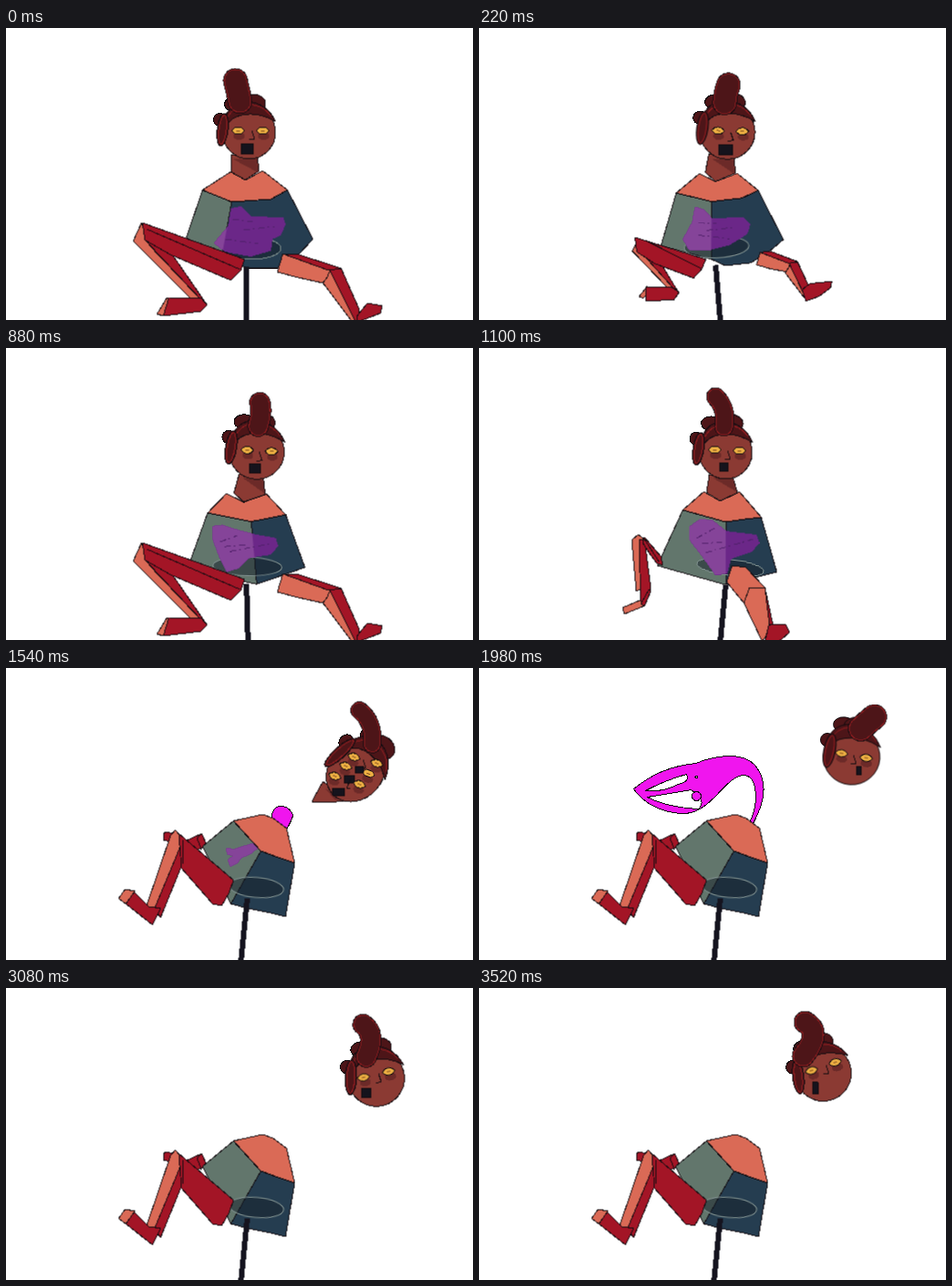
Animation, 512 px wide and 320 px high, one loop 3.63 s. Source, as an HTML page without scripts:

```html
<!DOCTYPE html>
<html lang="en">
<head>
<meta charset="utf-8">
<title>Puppet</title>
<style>
html, body { margin: 0; width: 100%; height: 100%; overflow: hidden; background: #fff }
svg { display: block; width: 100vw; height: 100vh; shape-rendering: crispEdges; stroke: #120c10; stroke-linejoin: round }
svg * { vector-effect: non-scaling-stroke; animation: 3.63s steps(5) infinite }
@property --w { syntax: '<length>'; inherits: true; initial-value: 24px }

.red { fill: #a31526 }
.salmon { fill: #da6a56 }
.skin { fill: #8b3a33 }
.shade { fill: #6c2a28; stroke: none }
.green { fill: #62766c }
.navy { fill: #253d50 }
.hair { fill: #4d1518 }
.dark { fill: #15131c }
.pink { fill: #f015ee }
.blob { stroke-width: 2; animation-name: blob }
.bun { fill: none; stroke-linecap: round; animation-name: bun }
.loose { animation-name: loose }
.cut { animation-timing-function: step-end }

/* torso */
@keyframes shoulders {
  0% { d: path("M215 177 247 190 290 187 308 177 281 156 262 166 246 157Z") }
  15.15% { d: path("M217 185 266 189 284 184 302 178 285 163 254 170 234 162Z") }
  30.3% { d: path("M223 177 270 190 291 187 309 185 285 157 264 167 246 157Z"); animation-timing-function: steps(4) }
  42.42%, 100% { d: path("M249 167 279 200 298 207 316 213 307 175 292 164 281 160Z") }
}
@keyframes left {
  0% { d: path("M215 177 247 190 236 250 197 230Z") }
  15.15% { d: path("M217 185 266 189 281 257 202 251Z") }
  30.3% { d: path("M223 177 270 190 270 259 195 238Z"); animation-timing-function: steps(4) }
  42.42%, 100% { d: path("M249 167 279 200 246 258 215 195Z") }
}
@keyframes right {
  0% { d: path("M247 190 290 187 308 177 336 231 320 248 298 262 262 262 236 250Z") }
  15.15% { d: path("M266 189 284 184 302 178 329 232 312 241 297 249 281 257 281 257Z") }
  30.3% { d: path("M270 190 291 187 309 185 326 245 310 249 290 254 270 259 270 259Z"); animation-timing-function: steps(4) }
  42.42%, 100% { d: path("M279 200 298 207 316 213 306 272 290 268 265 263 246 258 246 258Z") }
}
@keyframes blob {
  0% { d: path("M247 198 257 196 268 207 303 208 305 215 300 226 291 230 289 243 268 249 240 244 229 235 244 217Z") }
  15.15% { d: path("M222 195 228 204 233 211 270 209 282 214 283 222 275 230 250 227 229 231 216 239 217 225 220 205Z") }
  30.3% { d: path("M231 196 242 188 255 189 270 201 303 205 306 213 298 222 275 230 271 246 259 247 244 226 231 209Z"); animation-timing-function: steps(4) }
  42.42% { d: path("M242 198 250 199 262 195 273 192 275 196 268 202 257 207 252 213 246 216 244 210 250 205 243 203Z"); opacity: 1; animation-timing-function: step-end }
  45.45%, 100% { d: path("M242 198 250 199 262 195 273 192 275 196 268 202 257 207 252 213 246 216 244 210 250 205 243 203Z"); opacity: 0 }
}
@keyframes marks {
  0% { d: path("M248 209 270 212M260 221 294 217M240 231 276 236") }
  15.15% { d: path("M228 218 246 217M232 222 262 219M240 220 272 222") }
  30.3% { d: path("M238 208 258 197M244 214 266 212M248 224 300 209"); opacity: 1; animation-timing-function: step-end }
  33.33%, 100% { d: path("M238 208 258 197M244 214 266 212M248 224 300 209"); opacity: 0 }
}
@keyframes ring {
  0% { translate: 268px 241px; rotate: 0deg; scale: 33 12 }
  15.15% { translate: 248px 237px; rotate: -6deg; scale: 39 12 }
  30.3% { translate: 275px 240px; rotate: 7deg; scale: 37 9; animation-timing-function: steps(4) }
  42.42%, 100% { translate: 274px 240px; rotate: 5deg; scale: 30 11 }
}
@keyframes pole {
  0% { d: path("M263 261 263 322") }
  15.15% { d: path("M253 257 266 322") }
  30.3% { d: path("M270 259 264 322"); animation-timing-function: steps(4) }
  42.42%, 100% { d: path("M264 252 257 322") }
}
@keyframes under { 0%, 18.18%, 100% { opacity: 0 } 9.09% { opacity: 1 } }

/* near leg */
@keyframes thigh {
  0%, 24.24% { d: path("M149 213 261 253 257 265 246 276 180 248 152 232Z") }
  15.15% { d: path("M203 253 229 253 224 262 218 270 210 272 203 264Z"); animation-timing-function: steps(3) }
  24.24% { animation-timing-function: steps(2) }
  30.3% { d: path("M181 207 199 228 201 238 194 235 186 224 179 213Z"); animation-timing-function: steps(4) }
  42.42%, 100% { d: path("M189 181 249 232 244 246 236 260 226 258 192 219Z") }
}
@keyframes crease {
  0%, 24.24% { d: path("M154 220 256 264") }
  15.15% { d: path("M229 253 224 262"); animation-timing-function: steps(3) }
  24.24% { animation-timing-function: steps(2) }
  30.3% { d: path("M181 209 197 234"); animation-timing-function: steps(4) }
  42.42%, 100% { d: path("M193 188 193 214") }
}
@keyframes shin {
  0%, 24.24% { d: path("M139 233 148 213 157 238 212 296 203 297Z") }
  15.15% { d: path("M210 260 214 258 216 262 214 266 210 264Z"); animation-timing-function: steps(3) }
  24.24% { animation-timing-function: steps(2) }
  30.3% { d: path("M167 210 174 204 181 209 181 262 172 266Z"); animation-timing-function: steps(4) }
  42.42%, 100% { d: path("M180 183 185 177 194 187 163 264 153 262Z") }
}
@keyframes calf {
  0%, 24.24% { d: path("M152 232 182 248 220 303 213 297Z") }
  15.15% { d: path("M210 260 216 258 214 266 210 264Z"); animation-timing-function: steps(3) }
  24.24% { animation-timing-function: steps(2) }
  30.3% { d: path("M175 209 181 209 188 264 177 282Z"); animation-timing-function: steps(4) }
  42.42%, 100% { d: path("M194 187 193 214 169 273 162 264Z") }
}
@keyframes sole {
  0%, 24.24% { d: path("M165 313 176 295 182 297 172 315Z") }
  15.15% { d: path("M190 265 195 265 197 268 191 267Z"); animation-timing-function: steps(3) }
  24.24% { animation-timing-function: steps(2) }
  30.3% { d: path("M157 284 176 276 181 282 159 291Z"); animation-timing-function: steps(4) }
  42.42%, 100% { d: path("M123 252 130 242 141 244 132 259Z") }
}
@keyframes foot {
  0%, 24.24% { d: path("M178 295 214 296 220 303 213 310 172 315Z") }
  15.15% { d: path("M188 265 204 264 218 268 214 278 198 275Z"); animation-timing-function: steps(3) }
  24.24% { animation-timing-function: steps(2) }
  30.3% { d: path("M178 278 186 264 188 266 181 282 177 280Z"); animation-timing-function: steps(4) }
  42.42%, 100% { d: path("M140 245 156 261 169 263 160 281 131 258Z") }
}

/* other leg: swings in front, then folds away behind */
@keyframes thigh2 {
  0%, 24.24% { d: path("M303 247 355 264 352 272 347 279 320 273 297 267Z") }
  15.15% { d: path("M315 243 320 240 321 244 320 248 317 249 314 247Z"); animation-timing-function: steps(3) }
  24.24% { animation-timing-function: steps(2) }
  30.3%, 100% { d: path("M277 238 292 240 313 262 296 262 290 279 271 256Z") }
}
@keyframes strip2 {
  0%, 24.24% { d: path("M303 247 318 247 367 263 353 265Z") }
  15.15% { d: path("M315 243 320 240 321 244 318 246Z"); animation-timing-function: steps(3) }
  24.24% { animation-timing-function: steps(2) }
  30.3%, 100% { d: path("M292 240 292 240 313 262 313 262Z") }
}
@keyframes shin2 {
  0%, 24.24% { d: path("M352 265 356 264 385 321 378 320 347 279Z") }
  15.15% { d: path("M317 246 322 246 326 252 322 256 318 252Z"); animation-timing-function: steps(3) }
  24.24% { animation-timing-function: steps(2) }
  30.3%, 100% { d: path("M296 261 313 262 322 304 310 321 290 279Z") }
}
@keyframes calf2 {
  0%, 24.24% { d: path("M354 264 367 263 386 306 387 321 382 320Z") }
  15.15% { d: path("M317 246 322 246 326 252 322 256 318 252Z"); animation-timing-function: steps(3) }
  24.24% { animation-timing-function: steps(2) }
  30.3%, 100% { d: path("M313 262 313 262 322 304 314 316 318 303Z") }
}
@keyframes foot2 {
  0%, 24.24% { d: path("M384 316 390 308 396 301 412 304 410 312 400 316 384 322Z") }
  15.15% { d: path("M308 242 322 236 326 246 348 237 347 243 331 260 319 264Z"); animation-timing-function: steps(3) }
  24.24% { animation-timing-function: steps(2) }
  30.3%, 100% { d: path("M313 321 317 304 320 302 336 303 340 311 331 319 325 322Z") }
}
@keyframes early { 0% { opacity: 1 } 36.36%, 100% { opacity: 0 } }
@keyframes late { 0% { opacity: 0 } 36.36%, 100% { opacity: 1 } }

/* head */
@keyframes neck {
  0% { d: path("M246 138 275 140 277 156 262 166 246 157Z") }
  15.15% { d: path("M260 136 287 142 285 163 254 170 250 159Z") }
  30.3% { d: path("M252 138 278 142 283 158 264 167 249 158Z"); animation-timing-function: steps(4) }
  42.42% { d: path("M347 124 378 144 362 146 335 146 338 140Z"); animation-timing-function: steps(4) }
  54.54%, 100% { d: path("M400 104 412 108 410 112 402 114 398 110Z") }
}
@keyframes throat {
  0% { d: path("M248 143 275 142 276 158Z") }
  15.15% { d: path("M264 142 286 146 285 162Z") }
  30.3% { d: path("M256 142 278 142 282 157Z"); animation-timing-function: steps(4) }
  42.42% { d: path("M350 132 372 144 360 144Z"); animation-timing-function: steps(4) }
  54.54%, 100% { d: path("M402 106 408 108 404 110Z") }
}
@keyframes attached { 0% { opacity: 1 } 54.54%, 100% { opacity: 0 } }
@keyframes head {
  0% { translate: 266px 114px; rotate: 0deg; scale: 1 1 }
  15.15% { translate: 281px 113px; rotate: 3deg; scale: 1.1 1.06 }
  30.3% { translate: 270px 114px; rotate: 2deg; scale: 1 1; animation-timing-function: steps(4) }
  42.42% { translate: 383px 113px; rotate: 42deg; scale: 1.03 1.22; animation-timing-function: steps(4) }
  54.54% { translate: 408px 97px; rotate: 4deg; scale: 1.07 1.05; animation-timing-function: steps(6) }
  72.72% { translate: 394px 104px; rotate: 5deg; scale: 1.07 1.07; animation-timing-function: steps(8) }
  96.96%, 100% { translate: 377px 93px; rotate: -14deg; scale: 1.06 1.05 }
}
@keyframes loose {
  0% { translate: -3px 0 }
  15.15% { translate: 3px -2px }
  30.3% { translate: -4px 0; animation-timing-function: steps(4) }
  42.42% { translate: 0 0; animation-timing-function: steps(4) }
  54.54% { translate: 3px -2px; animation-timing-function: steps(6) }
  72.72%, 100% { translate: 0 0 }
}
@keyframes bun {
  0% { d: path("M256 80Q254 68 251 57") }
  15.15% { d: path("M288 84Q294 73 306 69") }
  30.3% { d: path("M268 86Q272 66 259 53"); animation-timing-function: steps(4) }
  42.42% { d: path("M401 83Q403 58 387 46"); animation-timing-function: steps(4) }
  54.54% { d: path("M418 66Q424 60 433 53"); animation-timing-function: steps(6) }
  72.72% { d: path("M394 76Q396 52 385 42"); animation-timing-function: steps(8) }
  96.96%, 100% { d: path("M355 74Q376 48 357 37") }
}
@keyframes bunsize {
  0%, 15.15% { --w: 24px }
  30.3% { --w: 18px; animation-timing-function: steps(4) }
  42.42% { --w: 17px; animation-timing-function: steps(4) }
  54.54% { --w: 25px; animation-timing-function: steps(6) }
  72.72% { --w: 19px; animation-timing-function: steps(8) }
  96.96%, 100% { --w: 22px }
}
@keyframes eye {
  0% { translate: 254px 112px; rotate: 0deg }
  15.15% { translate: 273px 112px; rotate: 10deg }
  30.3% { translate: 258px 111px; rotate: 0deg; animation-timing-function: steps(4) }
  42.42% { translate: 372px 107px; rotate: 20deg; animation-timing-function: steps(4) }
  54.54% { translate: 397px 93px; rotate: 8deg; animation-timing-function: steps(6) }
  72.72% { translate: 379px 105px; rotate: -6deg; animation-timing-function: steps(8) }
  96.96%, 100% { translate: 364px 90px; rotate: -16deg }
}
@keyframes eye2 {
  0% { translate: 281px 112px; rotate: 0deg }
  15.15% { translate: 299px 114px; rotate: 0deg }
  30.3% { translate: 285px 112px; rotate: 0deg; animation-timing-function: steps(4) }
  42.42% { translate: 397px 115px; rotate: 20deg; animation-timing-function: steps(4) }
  54.54% { translate: 424px 98px; rotate: 8deg; animation-timing-function: steps(6) }
  72.72% { translate: 408px 101px; rotate: -6deg; animation-timing-function: steps(8) }
  96.96%, 100% { translate: 390px 81px; rotate: -16deg }
}
@keyframes nose {
  0% { translate: 269px 118px }
  15.15% { translate: 285px 122px }
  30.3% { translate: 272px 118px; animation-timing-function: steps(4) }
  42.42% { translate: 391px 106px; animation-timing-function: steps(4) }
  54.54% { translate: 410px 101px; animation-timing-function: steps(6) }
  72.72% { translate: 396px 109px; animation-timing-function: steps(8) }
  96.96%, 100% { translate: 380px 90px }
}
@keyframes mouth {
  0% { translate: 264px 132px; scale: 13 11 }
  15.15% { translate: 279px 134px; scale: 17 10 }
  30.3% { translate: 268px 130px; scale: 9 9; animation-timing-function: steps(4) }
  42.42% { translate: 364px 135px; scale: 13 8; animation-timing-function: steps(4) }
  54.54% { translate: 416px 112px; scale: 5 9; animation-timing-function: steps(6) }
  72.72% { translate: 381px 120px; scale: 14 7; animation-timing-function: steps(8) }
  96.96%, 100% { translate: 368px 109px; scale: 6 13 }
}
@keyframes sway {
  0%, 72.72%, 90.9%, 100% { translate: 0 0 }
  72.72% { animation-timing-function: steps(3) }
  81.81% { translate: 30px 0; animation-timing-function: steps(3) }
}
@keyframes wink { 0%, 18.18%, 100% { opacity: 0 } 12.12% { opacity: 1 } }
@keyframes open { 0%, 18.18%, 100% { opacity: 1 } 12.12% { opacity: 0 } }
@keyframes many { 0%, 45.45%, 100% { opacity: 0 } 39.39% { opacity: 1 } }

/* creature */
@keyframes creature {
  0%, 30.3% { d: path("M270 180C269 180 269 180 268 179C267 178 267 177 268 176C269 175 270 175 271 176C272 177 272 178 272 178C272 179 271 180 270 180Z") }
  30.3% { animation-timing-function: steps(4) }
  42.42% { d: path("M305 175C298 174 296 172 294 169C291 165 290 160 292 157C295 151 300 150 303 151C309 152 313 157 314 161C313 167 309 172 308 175Z"); animation-timing-function: steps(4) }
  54.54%, 100% { d: path("M296 169C306 150 306 118 290 117C268 118 255 160 222 159C200 158 180 148 169 132C190 115 210 107 237 104C262 94 290 92 302 106C318 125 311 150 300 170Z") }
}
@keyframes jaws {
  0%, 42.42% { translate: 303px 162px; scale: 0 }
  42.42% { animation-timing-function: steps(4) }
  54.54%, 100% { translate: 0 0; scale: 1 }
}
@keyframes fly {
  0%, 54.54% { translate: 0 0 }
  54.54% { animation-timing-function: steps(2) }
  60.6% { translate: -96px -22px; animation-timing-function: steps(4) }
  72.72%, 100% { translate: -330px -140px }
}
</style>
</head>
<body>
<svg viewBox="-.5 -.5 512 320">
  <defs>
    <clipPath id="pane"><path style="animation-name:left"/></clipPath>
    <g id="eyeball">
      <ellipse class="shade" cx="1" cy="6" rx="6" ry="4"/>
      <path fill="#eeb043" d="M-7 0Q-4 -4 0 -4T7 0Q4 4 0 4T-7 0Z"/>
      <path stroke="#7d4a1c" d="M-2 0H2"/>
    </g>
  </defs>

  <g style="animation-name:fly">
    <path class="pink" style="animation-name:creature"/>
    <g fill="#fff" style="animation-name:jaws">
      <path d="M182 134Q205 122 227 116Q231 124 218 127Q200 136 182 134Z"/>
      <path d="M184 141Q215 136 232 133Q250 145 240 154Q205 152 184 141Z"/>
      <circle class="pink" cx="238" cy="140" r="5"/>
      <circle cx="238" cy="119" r="1.5"/>
    </g>
  </g>

  <g class="red cut" style="animation-name:late">
    <path d="M194 190 214 181 220 194 205 201Z"/>
    <path d="M214 181 209 186 214 199M172 181 175 179 188 182 184 191 172 188Z"/>
  </g>

  <path class="navy" style="animation-name:right"/>
  <path class="green" style="animation-name:left"/>
  <path class="cut" fill="#4b2c45" style="animation-name:under" d="M281 256 284 237 328 232Z"/>
  <circle r="1" fill="#141e28" fill-opacity=".5" stroke="#80918f" style="animation-name:ring"/>
  <path class="blob" fill="#6b2788" stroke="#6b2788"/>
  <g clip-path="url(#pane)"><path class="blob" fill="#854499" stroke="#854499"/></g>
  <path fill="none" stroke="#51206b" stroke-dasharray="7 3 2 4" style="animation-name:marks"/>
  <path class="salmon" style="animation-name:shoulders"/>
  <path stroke="#15141f" stroke-width="6" style="animation-name:pole"/>

  <path class="salmon" style="animation-name:shin"/>
  <path class="red" style="animation-name:calf"/>
  <path class="red" style="animation-name:thigh"/>
  <path style="animation-name:crease"/>
  <path class="salmon" style="animation-name:sole"/>
  <path class="red" style="animation-name:foot"/>

  <g class="cut" style="animation-name:early">
    <path class="salmon" style="animation-name:shin2"/>
    <path class="red" style="animation-name:calf2"/>
    <path class="salmon" style="animation-name:thigh2"/>
    <path class="red" style="animation-name:strip2"/>
    <path class="red" style="animation-name:foot2"/>
  </g>

  <g style="animation-name:sway">
    <g class="cut" style="animation-name:attached">
      <path class="skin" style="animation-name:neck"/>
      <path class="shade" style="animation-name:throat"/>
    </g>
    <g style="animation-name:head">
      <g class="hair loose">
        <circle cx="-29" cy="-14" r="7"/>
        <ellipse cx="-13" cy="-31" rx="11" ry="8"/>
      </g>
      <ellipse class="hair" cx="4" cy="-32" rx="14" ry="10"/>
      <circle class="skin" r="29"/>
      <path class="hair" d="M-28 -8Q-25 -33 -2 -34Q20 -32 29 -12Q10 -23 -8 -19Q-20 -17 -26 -5Z"/>
      <path fill="none" stroke="#941d20" d="M-25 -13Q-18 -30 -2 -31Q16 -30 24 -18"/>
      <g class="loose">
        <ellipse class="hair" cx="-26" cy="-3" rx="6" ry="18" transform="rotate(7 -26 -3)"/>
        <ellipse fill="none" stroke="#941d20" cx="-26" cy="-3" rx="4" ry="16" transform="rotate(7 -26 -3)"/>
      </g>
    </g>
    <g style="animation-name:bunsize">
      <path class="bun" style="stroke-width:calc(var(--w) + 3px)"/>
      <path class="bun" stroke="#941d20" style="stroke-width:calc(var(--w) + 1px)"/>
      <path class="bun" stroke="#4d1518" style="stroke-width:calc(var(--w) - 1px)"/>
    </g>
    <g style="animation-name:eye"><use href="#eyeball"/></g>
    <g class="cut" style="animation-name:open">
      <g style="animation-name:eye2"><use href="#eyeball"/></g>
    </g>
    <path class="cut" fill="none" style="animation-name:wink" d="M291 114 310 112M294 121 305 119M295 119 298 130M297 123 303 126M275 98 288 108"/>
    <path fill="none" style="animation-name:nose" d="M0 -6 3 3 -3 4"/>
    <rect class="dark" x="-.5" y="-.5" width="1" height="1" style="animation-name:mouth"/>
    <g class="cut" style="animation-name:many">
      <use href="#eyeball" transform="translate(381 97) rotate(20)"/>
      <use href="#eyeball" transform="translate(406 104) rotate(20)"/>
      <use href="#eyeball" transform="translate(387 127) rotate(20)"/>
      <use href="#eyeball" transform="translate(360 118) rotate(20)"/>
      <path class="dark" d="M382 107H391V114H382ZM370 117H381V125H370Z"/>
      <path fill="none" d="M377 122 373 131 377 132"/>
    </g>
  </g>
</svg>
</body>
</html>
```
